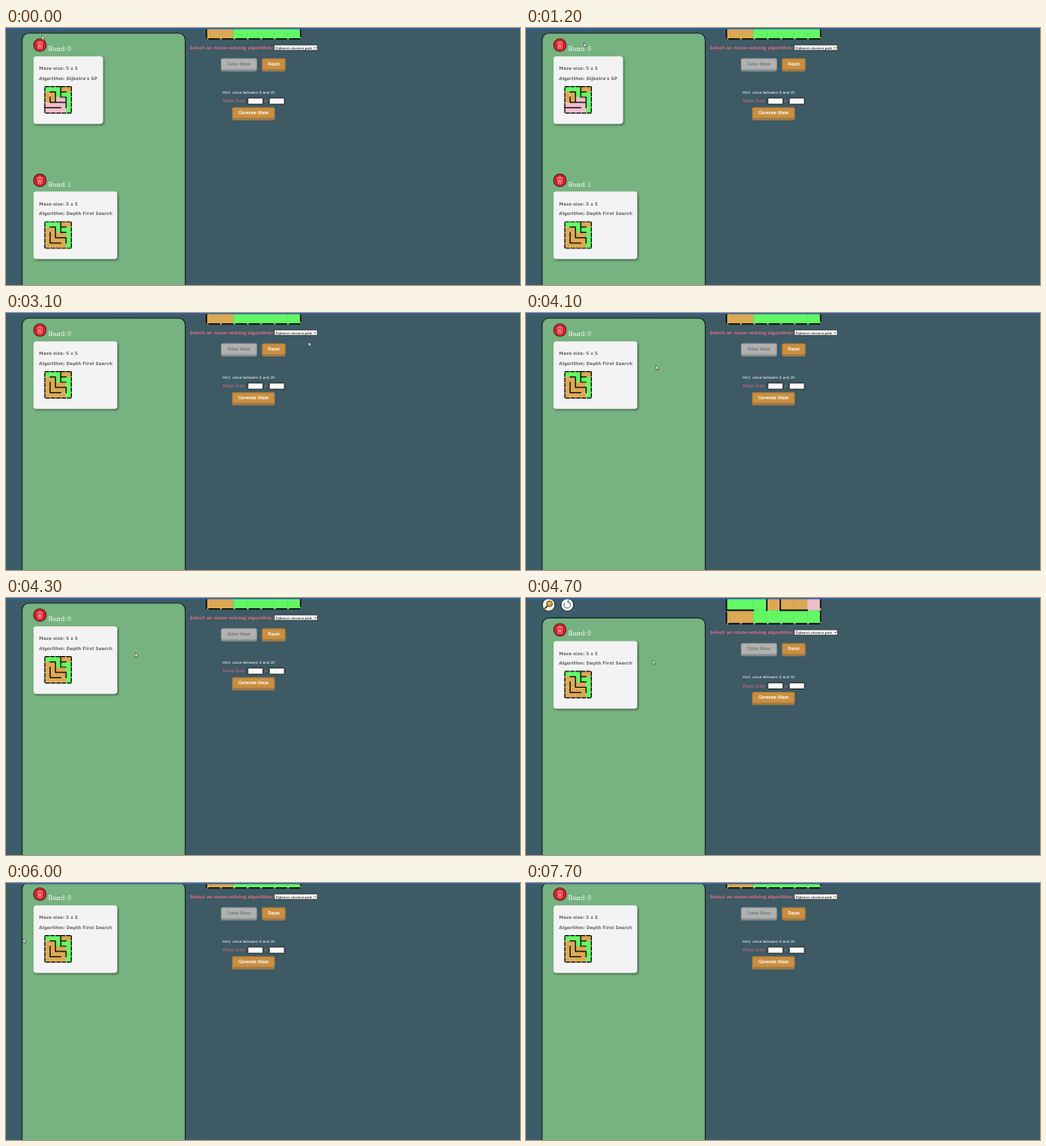
An HTML page for the animation above (7.9 s loop, 600 px wide and 301 px high).

```html
<!DOCTYPE html>
<html lang="en">
<head>
<meta charset="utf-8">
<title>Maze boards</title>
<style>
  html, body { margin: 0; width: 100%; height: 100%; overflow: hidden; background: #3d5a66; }
  svg { display: block; width: 600px; height: 301px; }
  text { white-space: pre; }
  .label { font: bold 5.07px "DejaVu Sans", sans-serif; }
  .plain { font: 5.07px "DejaVu Sans", sans-serif; }
  .hint { font-size: 4.11px; }
  .title { font: 7.6px "Liberation Serif", serif; fill: #fff; }
  .button { font: 5.15px "Liberation Sans", sans-serif; fill: #fff; stroke: #fff; stroke-width: .12; }
  .small { font: 4.2px "Liberation Sans", sans-serif; }
  .gray { fill: #666; }
  .pink { fill: #dc6b7e; }
  .wall { fill: none; stroke: #080808; }
</style>
</head>
<body>
<svg viewBox="0 0 600 301">
  <defs>
    <linearGradient id="back">
      <stop offset="0" stop-color="#3b5d6a"/>
      <stop offset=".4" stop-color="#3d5a65"/>
    </linearGradient>
    <filter id="shadow" x="-10%" y="-10%" width="125%" height="125%">
      <feDropShadow dx="1.2" dy="1.4" stdDeviation="1" flood-color="#122" flood-opacity=".6"/>
    </filter>
    <g id="trash">
      <circle cx="39.6" cy="20" r="7.3" fill="#d4141f" stroke="#521a20" stroke-width="1.1"/>
      <circle cx="39.6" cy="20" r="6.3" fill="none" stroke="#f0757a" stroke-width=".5" stroke-dasharray="1.5 1"/>
      <path d="M36 17.3h7.2M38.3 17v-1h2.6v1M36.8 17.6l.5 6.4h4.6l.5-6.4M38.5 18.8v4M39.6 18.8v4M40.7 18.8v4"
        fill="none" stroke="#f8c9c9" stroke-width=".65"/>
    </g>
  </defs>
  <rect width="600" height="301" fill="url(#back)"/>

  <g id="page">
    <g stroke="#111" stroke-width=".9">
      <circle cx="26.4" cy="-9.3" r="7.4" fill="#fbf6e4"/>
      <path d="M25 -8L21.8 -4.8" stroke-width="1.4"/>
      <circle cx="27.4" cy="-10.6" r="3.3" fill="#eda93a" stroke-width=".7"/>
      <circle cx="48.2" cy="-9.3" r="7.4" fill="#fff"/>
      <path d="M45.2 -11.6a3.8 3.8 0 1 0 4 -1.3M50.6 -15l-2.4 2 2.6 1.6" fill="none" stroke="#245e62"/>
    </g>
    <rect x="18.7" y="6" width="190.6" height="400" rx="8" fill="#76b380" stroke="#172426" stroke-width="1.2"/>
    <g id="boards"></g>
    <g id="mainMaze"></g>

    <text class="label pink" x="214.5" y="24.6">Select an maze-solving algorithm:</text>
    <rect x="313.2" y="20" width="50.2" height="6" rx=".6" fill="#fff" stroke="#222" stroke-width=".6"/>
    <text class="small" x="314.8" y="24.5">Dijkstra's shortest path</text>
    <path d="M359.6 22.4l1.3 1.4 1.3 -1.4" fill="none" stroke="#111" stroke-width=".7"/>
    <g id="buttons"></g>
    <text class="plain hint" x="252.8" y="76.8" fill="#fff">Hint: value between 0 and 20</text>
    <text class="plain pink" x="252.8" y="87.4">Maze Size:</text>
    <text class="plain pink" x="301.8" y="87.4">x</text>
    <g fill="#fff" stroke="#111" stroke-width=".9">
      <rect x="282.2" y="82" width="17.8" height="7.2" rx=".6"/>
      <rect x="307.2" y="82" width="17.8" height="7.2" rx=".6"/>
    </g>
    <g class="small" fill="#d9c7a2">
      <text x="288" y="87.1">7</text>
      <text x="313" y="87.1">7</text>
    </g>
  </g>

  <rect width="600" height="1.4" fill="#2b62b4"/>
  <g id="dialog">
    <path d="M232.6 -4H374.8V41.5a5 5 0 0 1 -5 5H237.6a5 5 0 0 1 -5 -5Z" fill="#f6f6f8" filter="url(#shadow)"/>
    <text x="239" y="12" font-size="5.1" font-weight="600" font-family="Open Sans, sans-serif" fill="#222">localhost:3000 says</text>
    <text x="239" y="21" font-size="4" font-family="Open Sans, sans-serif" fill="#333">Board deleted</text>
    <rect x="347.6" y="27.4" width="20.6" height="13" rx="6.5" fill="#fff" stroke="#1d3f78" stroke-width="1.3"/>
    <rect x="349.2" y="29" width="17.4" height="9.8" rx="4.9" fill="#2a5792"/>
    <text x="357.9" y="35.6" text-anchor="middle" font-size="4.3" font-weight="600" font-family="Open Sans, sans-serif" fill="#fff">OK</text>
  </g>
  <path id="cursor" d="M0 0V4.9L1.2 3.9 2 5.7 2.8 5.3 2.1 3.6H3.6Z" fill="#fff" stroke="#222" stroke-width=".5"/>
</svg>

<script>
const LOOP = 7900;
const BOARD_GAP = 158.4;
const DIALOG_OPEN = 2000, DIALOG_CLOSE = 3000;
const COLORS = { G: "#63f765", T: "#dba953", P: "#f0bdc8" };
const $ = id => document.getElementById(id);

// Cells are one unit wide; walls are a path on the same grid.
function maze(x, y, size, rows, walls, line) {
  const width = rows[0].length, height = rows.length;
  const cells = rows.map((row, j) => [...row].map((kind, i) =>
    `<rect x="${i}" y="${j}" width="1.02" height="1.02" fill="${COLORS[kind]}"/>`).join("")).join("");
  return `<g transform="translate(${x} ${y}) scale(${size})">${cells}
    <rect class="wall" width="${width}" height="${height}" stroke-width="${line}" stroke-dasharray=".86 .14"/>
    <path class="wall" d="${walls}" stroke-width="${line}" stroke-linecap="square"/></g>`;
}

function board(id, width, algorithm, rows, walls) {
  return `<g id="${id}"><use href="#trash"/><text class="title" x="49.4" y="27.2"></text>
    <rect x="32.2" y="33.2" width="${width}" height="79" rx="3" fill="#f4f3f3" filter="url(#shadow)"/>
    <text class="label gray" x="38.5" y="49.4">Maze size: 5 x 5</text>
    <text class="label gray" x="38.5" y="60.5">Algorithm: ${algorithm}</text>
    ${maze(45.3, 68.6, 6.2, rows, walls, .2)}</g>`;
}

function button(x, y, width, label, textX, disabled) {
  const [face, edge, base, ink] = disabled
    ? ["#b0b1b1", "#a2a3a3", "#84898a", "#777"]
    : ["#c98f42", "#b87c31", "#9a7a4d", "#fff"];
  return `<rect x="${x}" y="${y + 2}" width="${width}" height="13.4" rx="1.4" fill="${base}"/>
    <rect x="${x + .4}" y="${y + .4}" width="${width - .8}" height="12.4" rx="1.2" fill="${face}" stroke="${edge}" stroke-width=".9"/>
    <text class="button" x="${textX}" y="${y + 8.2}" style="fill:${ink};stroke:${ink}">${label}</text>`;
}

$("boards").innerHTML =
  board("first", 81, "Dijkstra's SP", ["GGGTT", "TTGGG", "TTPPG", "PPPPG", "PPPPG"],
    "M1 1H2V3M3 0V1H4M1 2V3H4V2H3M0 4H3M4 3V4M3 1V2") +
  board("second", 97.6, "Depth First Search", ["GGGTT", "TTGGG", "TTTTG", "TTTTG", "TTTTG"],
    "M1 1H2M3 0V1H4M1 2V4H3M2 2V3H4V4M3 1V2H4M2 1V2");
$("mainMaze").innerHTML = maze(234, -18.6, 15.7, ["GGGTTTP", "TTGGGGG"],
  "M0 1H2M3 0V1M4 0V1H6", .1);
$("buttons").innerHTML =
  button(251, 35.6, 41.8, "Solve Maze", 258.6, true) +
  button(298.8, 35.6, 27.4, "Reset", 305.8) +
  button(264, 92.8, 49.6, "Generate Maze", 271.3);

const cursorTrack = [
  [0, 41.5, 9], [500, 46, 13], [1200, 67.5, 17.5], [1600, 42, 19], [2000, 40, 19],
  [2500, 323, 23.5], [2800, 357, 33], [3000, 357, 33], [3300, 342, 36], [3900, 157, 60],
  [4100, 151.7, 61.5], [4700, 147.7, 72.8], [5200, 147, 75], [5650, 95, 120], [6000, 20, 65.3]
];
const scrollTrack = [[0, 0], [4500, 0], [4700, 17.3], [5000, 17.3], [5200, 0], [5400, 0], [5500, -7]];

function sample(track, time) {
  const next = track.findIndex(key => key[0] > time);
  if (next < 0) return track.at(-1).slice(1);
  const a = track[next - 1], b = track[next];
  const p = (time - a[0]) / (b[0] - a[0]), eased = p * p * (3 - 2 * p);
  return a.slice(1).map((value, i) => value + (b[i + 1] - value) * eased);
}

const move = (id, x, y) => $(id).setAttribute("transform", `translate(${x} ${y})`);
const show = (id, visible) => $(id).style.display = visible ? "" : "none";

function draw(now) {
  const time = Math.floor(now % LOOP / 100) * 100;
  const deleted = time >= DIALOG_CLOSE;
  show("first", !deleted);
  show("dialog", time >= DIALOG_OPEN && !deleted);
  show("cursor", time < 6100);
  move("second", 0, deleted ? 0 : BOARD_GAP);
  $("first").querySelector(".title").textContent = "Board: 0";
  $("second").querySelector(".title").textContent = deleted ? "Board: 0" : "Board: 1";
  move("page", 0, sample(scrollTrack, time)[0]);
  move("cursor", ...sample(cursorTrack, time));
}

const start = performance.now();
function tick() {
  draw(performance.now() - start);
  requestAnimationFrame(tick);
}
tick();
</script>
</body>
</html>
```
